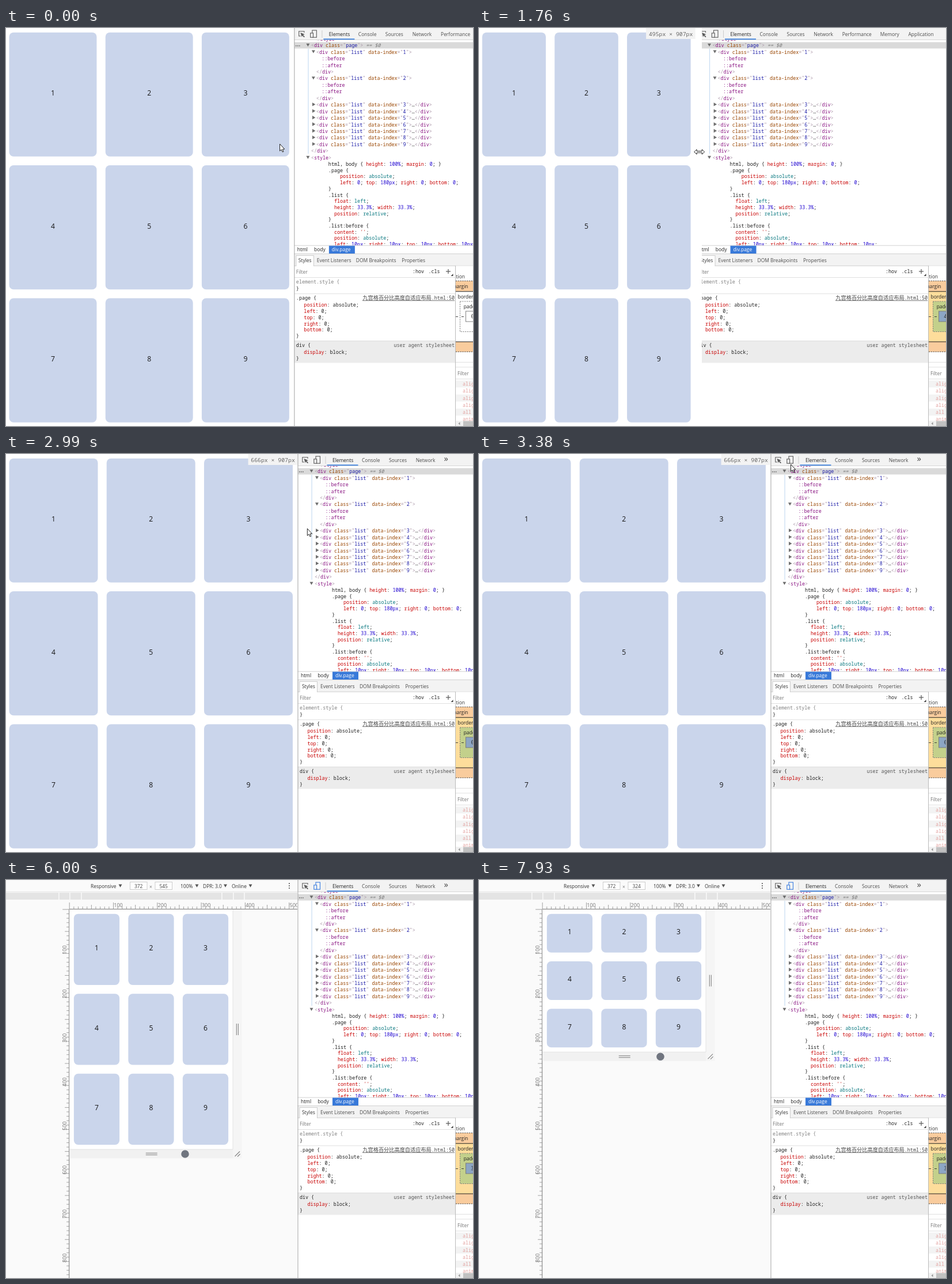
Animation, 811 px wide and 690 px high, one loop 8 s. Source, as an HTML page with a canvas:

```html
<!DOCTYPE html>
<html lang="en">
<head>
<meta charset="utf-8">
<title>Responsive nine-cell grid</title>
<style>
html, body { margin: 0; width: 100%; height: 100%; overflow: hidden; background: #fff; }
canvas { display: block; width: 811px; height: 690px; }
</style>
</head>
<body>
<canvas id="stage" width="811" height="690"></canvas>
<script>
const ctx = document.getElementById('stage').getContext('2d');
const LOOP = 8000, W = 811, H = 690, SCALE = 0.763;
const MONO = '8.38px "Noto Sans Mono", "DejaVu Sans Mono", monospace';
const UI = '8.45px "Open Sans", "Noto Sans", sans-serif';
const EMU = { x: 110.2, y: 51 };

// keys: [time, value, ...]
const pageKeys = [[670, 658], [800, 650], [1130, 592], [1300, 538], [1440, 497], [1530, 484],
  [1680, 484], [1900, 514], [2300, 597], [2410, 626], [2460, 636], [2600, 658], [2800, 666]];
const heightKeys = [[5740, 599], [5900, 574], [6300, 460], [6540, 393], [6690, 369], [6950, 340],
  [7240, 326], [7660, 326], [7930, 324]];
const mouseKeys = [[30, 475, 201], [370, 502, 211], [640, 501, 211], [800, 486, 211],
  [1130, 427, 211], [1440, 370, 212], [1530, 367, 213], [1680, 367, 214], [2300, 487, 220],
  [2480, 503, 220], [2720, 508, 218], [3050, 526, 110], [3380, 541, 18], [4370, 541, 17],
  [4650, 440, 180], [4900, 309, 410], [5080, 312.5, 470], [5160, 312, 489], [5300, 311, 512],
  [5460, 311, 516], [6690, 311, 340], [7930, 315, 307]];

function at(keys, t) {
  if (t <= keys[0][0]) return keys[0].slice(1);
  for (let i = 1; i < keys.length; i++) {
    const a = keys[i - 1], b = keys[i];
    if (t <= b[0]) {
      const k = (t - a[0]) / (b[0] - a[0]);
      return a.slice(1).map((v, j) => v + (b[j + 1] - v) * k);
    }
  }
  return keys[keys.length - 1].slice(1);
}

const edge = px => px * SCALE - 2.1;

function rect(x, y, w, h, color) {
  ctx.fillStyle = color;
  ctx.fillRect(x, y, w, h);
}

function line(x1, y1, x2, y2, color, dash = [], width = 1) {
  ctx.strokeStyle = color;
  ctx.lineWidth = width;
  ctx.setLineDash(dash);
  ctx.beginPath();
  ctx.moveTo(x1, y1);
  ctx.lineTo(x2, y2);
  ctx.stroke();
  ctx.setLineDash([]);
}

function text(str, x, y, color = '#333', font = UI, align = 'left') {
  ctx.font = font;
  ctx.fillStyle = color;
  ctx.textAlign = align;
  ctx.fillText(str, x, y + 3.1);
  return x + ctx.measureText(str).width;
}

function runs(parts, x, y) {
  for (const [str, color] of parts) x = text(str, x, y, color, MONO);
  return x;
}

function poly(points, fill, stroke) {
  ctx.beginPath();
  points.forEach(([x, y]) => ctx.lineTo(x, y));
  ctx.closePath();
  if (fill) { ctx.fillStyle = fill; ctx.fill(); }
  if (stroke) { ctx.strokeStyle = stroke; ctx.lineWidth = 1; ctx.stroke(); }
}

const down = (x, y, r = 3, color = '#555') =>
  poly([[x - r, y - r * 0.85], [x + r, y - r * 0.85], [x, y + r * 0.9]], color);
const right = (x, y) => poly([[x - 2.4, y - 3.2], [x + 3, y], [x - 2.4, y + 3.2]], '#6e6e6e');

function clipped(x, y, w, h, draw) {
  ctx.save();
  ctx.beginPath();
  ctx.rect(x, y, w, h);
  ctx.clip();
  draw();
  ctx.restore();
}

function cells(x, y, w, h) {
  const gap = 10 * SCALE, cw = w * 0.333, ch = h * 0.333;
  for (let i = 0; i < 9; i++) {
    const cx = x + (i % 3) * cw, cy = y + Math.floor(i / 3) * ch;
    ctx.fillStyle = '#cad5eb';
    ctx.beginPath();
    ctx.roundRect(cx + gap, cy + gap, cw - 2 * gap, ch - 2 * gap, 7.6);
    ctx.fill();
    text(i + 1, cx + cw / 2, cy + ch / 2 - 1.2, '#151515', '12.2px "Open Sans", "Noto Sans", sans-serif', 'center');
  }
}

function plainPage(t, px) {
  cells(-2.1, 0, px * SCALE, 907 * SCALE);
  if (t > 700 && t < 3590) {
    const r = edge(px);
    rect(r - 85.5, 0, 85.5, 19, '#f3f3f3');
    text(Math.round(px) + 'px × 907px', r - 4.3, 10.5, '#666',
      '9.8px "Noto Sans Mono", "DejaVu Sans Mono", monospace', 'right');
  }
}

function rulers(end) {
  const { x, y } = EMU, ink = '#8a8a8a', font = '9px "Open Sans", "Noto Sans", sans-serif';
  line(x, y - 0.5, end, y - 0.5, '#777');
  line(x - 0.5, y, x - 0.5, H, '#777');
  for (let i = 0; i < 86; i++) {
    const d = i * 10 * SCALE;
    const len = i % 10 === 0 ? 12 : i % 5 === 0 ? 8 : 5;
    if (x + d < end) line(x + d, y - len, x + d, y, ink, [], 0.8);
    if (y + d < H) line(x - len, y + d, x, y + d, ink, [], 0.8);
    if (i && i % 10 === 0) {
      if (x + d < end) text(i * 10, x + d + 0.8, y - 6.8, '#777', font);
      ctx.save();
      ctx.translate(x - 8, y + d + 1.5);
      ctx.rotate(-Math.PI / 2);
      text(i * 10, 0, 0, '#777', font);
      ctx.restore();
    }
  }
}

function emulator(t, px) {
  const end = edge(px), h = at(heightKeys, t)[0];
  const pw = 372 * SCALE, ph = h * SCALE, r = EMU.x + pw, b = EMU.y + ph;
  rect(0, 0, end, H, '#fafafa');
  rect(0, 20, end, 1, '#e3e3e3');
  text('Responsive', 147, 10.5);
  down(198.5, 10);
  text('×', 249, 11.5, '#777');
  for (const [x, v] of [[215, 372], [258.5, Math.round(h)]]) {
    rect(x, 3, 30.5, 14, '#ccc');
    rect(x + 1, 4, 28.5, 12, '#fff');
    text(v, x + 15.2, 10.5, '#444', UI, 'center');
  }
  text('100%', 303, 10.5);
  down(331.5, 10);
  text('DPR: 3.0', 342, 10.5);
  down(381, 10);
  text('Online', 392, 10.5);
  down(424.5, 10);
  for (const y of [6, 10, 14]) rect(491, y - 0.8, 1.8, 1.8, '#555');

  rect(0, 22, end, 12, '#e4e4e4');
  for (const d of [122, 142, 161]) {
    rect(252.3 - d, 22, 1.2, 12, '#fff');
    rect(252.3 + d, 22, 1.2, 12, '#fff');
  }
  rulers(end);

  rect(r, EMU.y, 15.5, ph + 15.5, '#f5f5f5');
  rect(EMU.x, b, pw, 15.5, t > 5300 ? '#f1f1f1' : '#f5f5f5');
  rect(EMU.x, EMU.y, pw, ph, '#fff');
  line(EMU.x, b, r, b, '#dedede', [], 0.8);
  line(r, EMU.y, r, b, '#dedede', [], 0.8);
  cells(EMU.x, EMU.y, pw, ph);

  const mx = EMU.x + pw / 2 + 0.6, my = EMU.y + ph / 2;
  for (const d of [6.5, 9.5]) {
    line(r + d - 0.2, my - 10, r + d - 0.2, my + 10, '#858585', [], 1.1);
    line(mx - 10, b + d, mx + 10, b + d, '#858585', [], 1.1);
  }
  line(r + 3.5, b + 12, r + 12, b + 3.5, '#858585', [], 1.1);
  line(r + 8, b + 12.5, r + 12.5, b + 8, '#858585', [], 1.1);
}

const TAG = '#881280', PUNC = '#a894a6', NAME = '#994500', VAL = '#1a1aa6';
const attr = (name, value) => [[' ' + name, NAME], ['="', PUNC], [value, VAL], ['"', PUNC]];
const open = (tag, ...attrs) => [['<', PUNC], [tag, TAG], ...attrs.flat(), ['>', PUNC]];
const close = tag => [['</', PUNC], [tag, TAG], ['>', PUNC]];
const item = n => open('div', attr('class', 'list'), attr('data-index', n));

const sheet = [
  [0, 'html, body { height: 100%; margin: 0; }'],
  [0, '.page {'], [4, 'position: absolute;'], [4, 'left: 0; top: 180px; right: 0; bottom: 0;'], [0, '}'],
  [0, '.list {'], [2, 'float: left;'], [2, 'height: 33.3%; width: 33.3%;'], [2, 'position: relative;'], [0, '}'],
  [0, '.list:before {'], [2, "content: '';"], [2, 'position: absolute;'],
  [2, 'left: 10px; right: 10px; top: 10px; bottom: 10px;']
];

function cssParts(src) {
  return src.split(/([a-z-]+: [^;]+;)/).filter(Boolean).flatMap(s => {
    const m = s.match(/^([a-z-]+): ([^;]+);$/);
    if (!m) return [[s, '#222']];
    const color = /^\d/.test(m[2]) ? '#1c00cf' : m[2][0] === "'" ? '#c41a16' : '#07777f';
    return [[m[1], '#c80000'], [': ', '#222'], [m[2], color], [';', '#222']];
  });
}

function tree(L) {
  rect(L, 24.5, W, 11, '#dadada');
  runs(close('style'), L + 35, 18.4);
  for (let i = 0; i < 3; i++) rect(L + 2.5 + i * 3, 30, 1.7, 1.7, '#777');
  line(L + 24.6, 36, L + 24.6, 218, '#bcd6f0');
  down(L + 24, 29.5, 3, '#6e6e6e');
  const x = runs(open('div', attr('class', 'page')), L + 29.5, 30);
  text(' == $0', x, 30, '#777', 'italic ' + MONO);
  let y = 41.5;
  const step = 11.45;
  for (let n = 1; n <= 9; n++) {
    if (n < 3) {
      down(L + 33.5, y - 0.5, 3, '#6e6e6e');
      runs(item(n), L + 38.5, y);
      runs([['::before', TAG]], L + 48, y += step);
      runs([['::after', TAG]], L + 48, y += step);
      runs(close('div'), L + 38.5, y += step);
    } else {
      right(L + 34, y - 0.7);
      runs([...item(n), ['…', '#333'], ...close('div')], L + 38.5, y);
    }
    y += step;
  }
  runs(close('div'), L + 29.5, y);
  down(L + 24, y + step - 0.5, 3, '#6e6e6e');
  runs(open('style'), L + 29.5, y + step);
  sheet.forEach(([indent, src], i) => runs(cssParts(src), L + 59.5 + indent * 5.03, 236 + i * 10.68));
}

function toolbar(L, emu) {
  rect(L, 0, W, 20, '#f3f3f3');
  rect(L, 20, W, 0.8, '#ccc');
  const ink = '#5a5a5a', x = L + 7.5;
  ctx.strokeStyle = ink;
  ctx.lineWidth = 1.1;
  ctx.beginPath();
  ctx.moveTo(x + 4, 14);
  ctx.lineTo(x + 0.8, 14);
  ctx.lineTo(x + 0.8, 5.8);
  ctx.lineTo(x + 10, 5.8);
  ctx.lineTo(x + 10, 8);
  ctx.stroke();
  poly([[x + 3.5, 8], [x + 11, 11], [x + 8, 12], [x + 11, 15], [x + 9.8, 16.2], [x + 6.9, 13.2], [x + 5.8, 15.6]], ink);
  ctx.strokeStyle = emu ? '#3b7de0' : ink;
  ctx.strokeRect(L + 31.5, 4, 7.5, 12.2);
  rect(L + 28, 8.5, 5.5, 7.8, '#f3f3f3');
  ctx.strokeRect(L + 28.3, 8.8, 4.8, 7.4);
  rect(L + 48, 4, 1, 13, '#ccc');

  rect(L + 51, 18.4, 54, 1.8, '#4285e0');
  const tabs = [['Elements', 60.5, 97], ['Console', 111.5, 145], ['Sources', 158.5, 190.5],
    ['Network', 205.3, 240], ['Performance', 254.7, 306], ['Memory', 320.8, 355], ['Application', 369.5, 414]];
  for (const [name, from, to] of tabs) {
    if (L + to > 811) {
      if (name === 'Performance') text('»', L + 254, 9.5, '#444', '15px "Open Sans", "Noto Sans", sans-serif');
      break;
    }
    text(name, L + from, 10.5, name === 'Elements' ? '#222' : '#4c4c4c');
  }
}

function rule(L, y, head, props, tone = '#222') {
  text(head, L + 3.5, y, tone, MONO);
  props.forEach(([name, value], i) =>
    runs([[name, '#c80000'], [': ' + value + ';', '#222']], L + 17, y + 12.3 + i * 10.7));
  text('}', L + 3.5, y + 12.3 + props.length * 10.75, '#222', MONO);
}

function styles(L) {
  rect(L, 377, W, 14.5, '#fff');
  rect(L, 376.6, W, 0.9, '#ccc');
  rect(L + 60.5, 377.5, 45, 13.5, '#3879d9');
  text('html', L + 5.5, 384.3, '#222');
  text('body', L + 34.7, 384.3, '#222');
  text('div.page', L + 65.5, 384.3, '#fff');
  rect(L, 391, W, 21.5, '#f3f3f3');
  rect(L, 391, W, 0.9, '#ccc');
  rect(L, 411.8, W, 0.9, '#ccc');
  rect(L + 3, 394, 31.5, 19, '#ccc');
  rect(L + 4, 395, 29.5, 18, '#fff');
  text('Styles', L + 7.5, 403);
  text('Event Listeners', L + 39.5, 403, '#4c4c4c');
  text('DOM Breakpoints', L + 107.5, 403, '#4c4c4c');
  text('Properties', L + 187, 403, '#4c4c4c');

  text('Filter', L + 3.5, 422.8, '#777');
  text(':hov', 706, 422.3, '#222', MONO);
  text('.cls', 733.5, 422.3, '#222', MONO);
  line(764, 422, 772, 422, '#555', [], 1.2);
  line(768, 418, 768, 426, '#555', [], 1.2);
  poly([[776.5, 426], [776.5, 430], [772.5, 430]], '#444');
  rect(L, 432, 780 - L, 0.9, '#ddd');
  rule(L, 440, 'element.style {', [], '#808080');
  rect(L, 460.3, 780 - L, 0.9, '#ddd');
  rule(L, 468, '.page {', [['position', 'absolute'], ['left', '0'], ['top', '0'], ['right', '0'], ['bottom', '0']]);
  text('.html:50', 779, 468, '#444', MONO, 'right');
  text('九宫格百分比高度自适应布局', 738.8, 468, '#444', '9.2px "Noto Sans CJK SC", "Noto Sans CJK", sans-serif', 'right');
  rect(619, 472.3, 160, 0.8, '#555');
  rect(L, 542, 780 - L, 38.5, '#ececec');
  rect(L, 542, 780 - L, 0.9, '#ddd');
  text('user agent stylesheet', 779, 550, '#555', MONO, 'right');
  rule(L, 550, 'div {', [['display', 'block']]);
}

function sidebar(t) {
  const tint = t > 1680;
  const digit = t > 3800 ? '3' : tint && t < 2500 ? '4' : '6';
  rect(780, 412.5, 31, 278, '#fff');
  rect(780, 412, 1, 278, '#bbb');
  clipped(781, 412, 30, 278, () => {
    text('position', 797, 430.5, '#333', UI, 'right');
    rect(781, 438.5, 30, 123, '#f9cc9d');
    line(781, 438.5, 811, 438.5, '#444', [2.3, 1.5], 0.9);
    line(781, 561.3, 811, 561.3, '#444', [2.3, 1.5], 0.9);
    text('margin', 802.5, 448, '#222', UI, 'right');
    rect(781, 456.5, 30, 87.5, tint ? '#fddd9b' : '#fff');
    rect(781, 456.3, 30, 1, '#222');
    rect(781, 543.5, 30, 1, '#222');
    text('border', 784.5, 465.5, '#222');
    rect(788.5, 474, 30, 52.5, tint ? '#c3d08b' : '#fff');
    ctx.strokeStyle = '#777';
    ctx.lineWidth = 0.9;
    ctx.setLineDash([2.3, 1.5]);
    ctx.strokeRect(788.5, 474, 40, 52.5);
    ctx.setLineDash([]);
    text('padding', 794.7, 483, '#222');
    rect(798.5, 491, 30, 18, tint ? '#8ca5c4' : '#fff');
    ctx.strokeStyle = '#777';
    ctx.strokeRect(798.5, 491, 30, 18);
    text(digit, 807.5, 500.3, '#222');
    rect(781, 500, 4, 0.9, '#333');
    rect(791, 500, 4, 0.9, '#333');

    rect(781, 579, 30, 0.9, '#ddd');
    rect(781, 587.5, 30, 0.9, '#ddd');
    text('Filter', 784, 599, '#777');
    rect(781, 608, 30, 0.9, '#ddd');
    ['align-content', 'align-items', 'align-self', 'alignment', 'all', 'animation'].forEach((name, i) => {
      const y = 617 + i * 12.2;
      if (i % 2 === 0) rect(781, y - 6, 30, 12.2, '#f3f3f3');
      text(name, 793, y, '#e3a3a0', MONO);
    });
    rect(781, 681, 30, 9, '#f1f1f1');
    poly([[788.5, 683], [785.5, 685.8], [788.5, 688.5]], '#999');
    rect(794, 681.5, 17, 8.5, '#c1c1c1');
  });
}

function panel(t, px, left, emu) {
  const L = edge(px) + 0.4;
  clipped(left, 0, W - left, H, () => {
    rect(left, 0, W, H, '#fff');
    clipped(L, 20, W, 357, () => tree(L));
    toolbar(L, emu);
    styles(L);
    sidebar(t);
    rect(L, 0, 1, H, '#a3a3a3');
  });
}

function arrow(x, y) {
  poly([[x + 0.5, y], [x + 0.5, y + 12.2], [x + 3.2, y + 9.8], [x + 5.2, y + 14], [x + 7, y + 13.2],
    [x + 5.2, y + 9.2], [x + 8.8, y + 9]], '#fff', '#222');
}

function doubleArrow(x, y, angle) {
  ctx.save();
  ctx.translate(x, y);
  ctx.rotate(angle);
  const half = [[-9, 0], [-4.5, -4.2], [-4.5, -1.3], [4.5, -1.3], [4.5, -4.2], [9, 0]];
  const back = half.slice(1, 5).reverse().map(([a, b]) => [a, -b]);
  poly([...half, ...back], '#fff', '#222');
  ctx.restore();
}

function pointer(t) {
  let [x, y] = at(mouseKeys, t);
  if (t > 5400) y = EMU.y + at(heightKeys, t)[0] * SCALE + 8;
  if ((t > 330 && t < 2780)) doubleArrow(x, y, 0);
  else if (t > 4400 && x < 394 && y < 508) {
    ctx.beginPath();
    ctx.arc(x, y, 7.4, 0, Math.PI * 2);
    ctx.fillStyle = '#70757f';
    ctx.fill();
    ctx.strokeStyle = '#f4f4f4';
    ctx.lineWidth = 1.2;
    ctx.stroke();
  } else if (t > 5160) doubleArrow(x, y, Math.PI / 2);
  else arrow(x, y);
}

function draw(t) {
  const px = at(pageKeys, t)[0], emu = t >= 3800;
  const left = Math.max(edge(px), edge(at(pageKeys, t + 110)[0]));
  rect(0, 0, W, H, '#fff');
  if (emu) emulator(t, px);
  else plainPage(t, px);
  panel(t, px, left, emu);
  pointer(t);
}

const start = performance.now();
function tick() {
  draw((performance.now() - start) % LOOP);
  requestAnimationFrame(tick);
}
tick();
</script>
</body>
</html>
```
